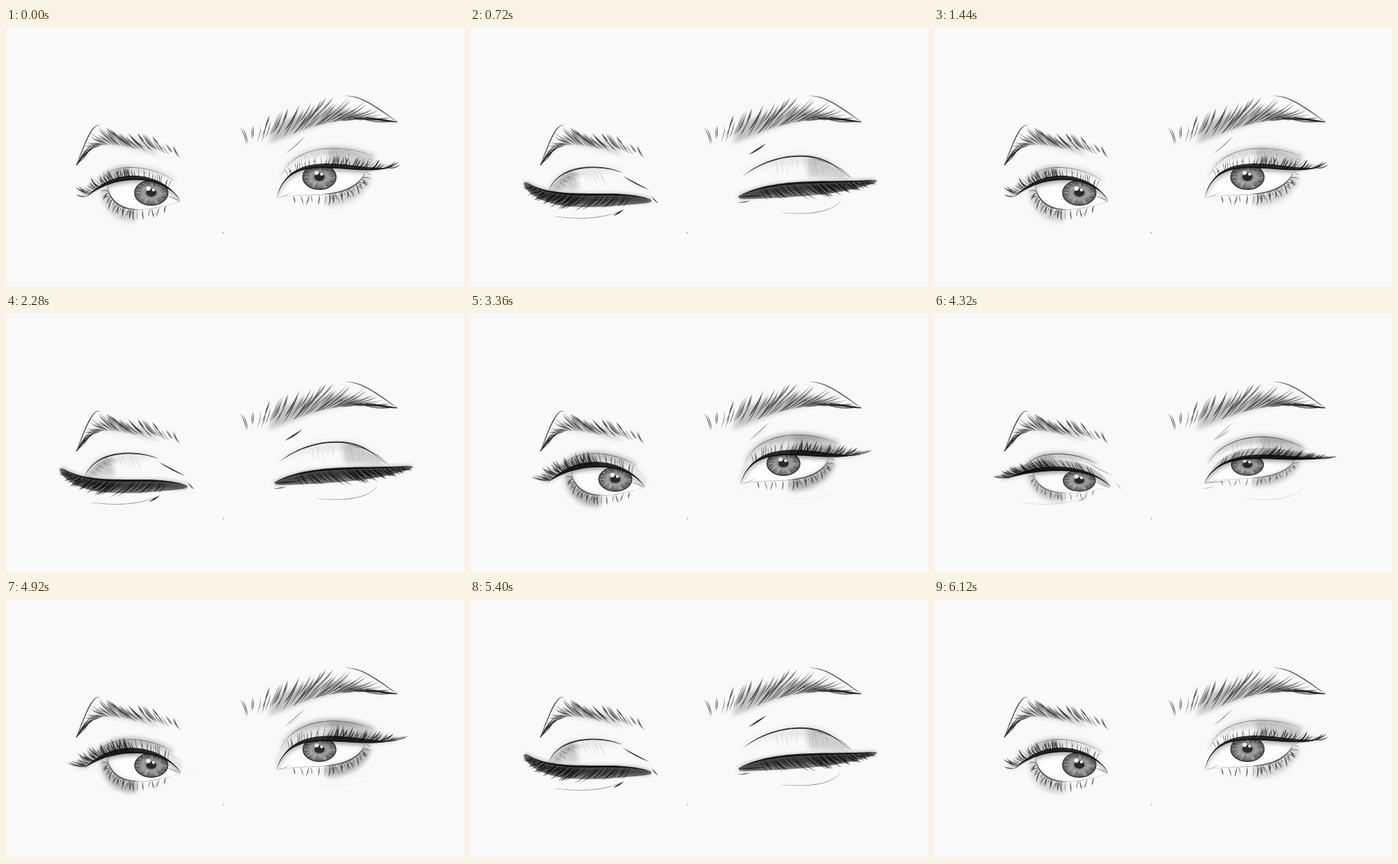
Animation, 640 px wide and 360 px high, one loop 6.24 s. Source, as an HTML page:

```html
<!DOCTYPE html>
<html lang="en">
<head>
<meta charset="utf-8">
<title>Blinking eyes</title>
<style>
  html, body { margin: 0; width: 100%; height: 100%; overflow: hidden; background: #f9f9f9; }
  svg { display: block; width: 100vw; height: 100vh; }
</style>
</head>
<body>
<svg id="stage" viewBox="0 0 640 360" fill="#0b0b0b">
  <defs>
    <filter id="soft" x="-30%" y="-60%" width="160%" height="220%"><feGaussianBlur stdDeviation="3"/></filter>
    <filter id="pencil"><feGaussianBlur stdDeviation=".35"/></filter>
    <radialGradient id="irisTone">
      <stop offset="0" stop-color="#666"/>
      <stop offset=".5" stop-color="#a0a0a0"/>
      <stop offset="1" stop-color="#5c5c5c"/>
    </radialGradient>
  </defs>
</svg>
<script>
const stage = document.getElementById('stage');
const OPEN = 0, CLOSED = 5;

// Cubic Béziers from the inner to the outer end; pairs are [open, closed].
const eyes = [
  {
    name: 'left', side: -1,
    lid: ['244,242 222,202 150,202 112,236', '254,240 205,222 125,246 78,215'],
    crease: ['236,214 215,196 155,183 132,210', '213,202 185,190 125,188 110,227'],
    low: '244,242 215,250 150,272 141,219',
    underline: '211,254 185,268 145,267 113,262',
    iris: [203, 230],
    openMarks: ['244,242 224,234', '204,262 214,257'],
    closedMarks: ['200,262 215,253', '213,206 251,226', '254,235 263,245']
  },
  {
    name: 'right', side: 1,
    lid: ['378,238 395,166 480,208 536,195', '375,235 425,209 500,218 566,212'],
    crease: ['383,210 398,166 460,158 515,179', '381,207 420,175 490,165 522,204'],
    low: '378,238 412,226 480,246 502,202',
    underline: '428,257 470,262 508,258 519,239',
    iris: [438, 208],
    openMarks: ['390,176 418,151', '379,238 400,229'],
    closedMarks: ['389,177 414,161', '374,235 413,233', '374,244 392,241']
  }
];

const brows = [
  { side: -1, weight: .7, lower: '246,184 205,175 160,165 120,164 98,192', upper: '236,162 195,147 155,144 124,138 98,192' },
  { side: 1, weight: 1, lower: '336,168 376,158 430,138 490,125 547,131', upper: '322,136 380,116 430,99 490,97 547,131' }
];

const mix = (a, b, t) => a + (b - a) * t;
const mixPoint = (p, q, t) => [mix(p[0], q[0], t), mix(p[1], q[1], t)];
const shift = (p, dx, dy) => [p[0] + dx, p[1] + dy];
const noise = n => { const s = Math.sin(n * 12.9898) * 43758.5453; return s - Math.floor(s); };
const parse = text => text.split(' ').map(pair => pair.split(',').map(Number));
const xy = p => p[0].toFixed(1) + ',' + p[1].toFixed(1);
const hump = u => Math.sin(Math.PI * Math.min(Math.max(u, 0), 1));

function bezier(text) {
  const pts = parse(text);
  return u => {
    let level = pts;
    while (level.length > 1) level = level.slice(1).map((p, i) => mixPoint(level[i], p, u));
    return level[0];
  };
}

// Smooth curve through the points
function spline(text) {
  const pts = parse(text), last = pts.length - 1;
  return u => {
    const x = Math.min(Math.max(u, 0), 1) * last, i = Math.min(Math.floor(x), last - 1), t = x - i;
    const [a, b, c, d] = [-1, 0, 1, 2].map(k => pts[Math.min(Math.max(i + k, 0), last)]);
    return [0, 1].map(k => b[k] + .5 * t * (c[k] - a[k] +
      t * (2 * a[k] - 5 * b[k] + 4 * c[k] - d[k] + t * (3 * (b[k] - c[k]) + d[k] - a[k]))));
  };
}

const blend = (a, b, t) => u => mixPoint(a(u), b(u), typeof t === 'function' ? t(u) : t);
const lift = (c, dy) => u => shift(c(u), 0, dy);
const part = (c, from, to = 1) => u => c(mix(from, to, u));

const samples = (c, n = 28) => Array.from({ length: n + 1 }, (_, i) => c(i / n));
const polygon = pts => 'M' + pts.map(xy).join('L') + 'Z';
const area = (a, b) => polygon([...samples(a), ...samples(b).reverse()]);

// Leaf-shaped pencil stroke
function stroke(p, q, width, bend = 0) {
  const dx = q[0] - p[0], dy = q[1] - p[1], len = Math.hypot(dx, dy) || 1;
  const control = k => xy([(p[0] + q[0]) / 2 - dy * (bend + k / len), (p[1] + q[1]) / 2 + dx * (bend + k / len)]);
  return `M${xy(p)}Q${control(width)} ${xy(q)}Q${control(-width)} ${xy(p)}Z`;
}

// Long stroke that tapers at both ends
function ribbon(c, width) {
  const side = sign => u => {
    const p = c(u), a = c(Math.max(u - .02, 0)), b = c(Math.min(u + .02, 1));
    const k = sign * width / 2 * Math.pow(hump(u), .7) / (Math.hypot(b[0] - a[0], b[1] - a[1]) || 1);
    return shift(p, (a[1] - b[1]) * k, (b[0] - a[0]) * k);
  };
  return area(side(1), side(-1));
}

// Row of strokes from one curve to another
function hairs(root, tip, { n, width, bend = 0, from = 0, to = 1, trimRoot = 0, trimTip = .3, seed = 1, spread = .03 }) {
  let d = '';
  for (let i = 0; i < n; i++) {
    const r = k => noise(i * 7 + k + seed * 101);
    const u = mix(from, to, (i + r(1)) / n), a = root(u), b = tip(u + (r(2) - .5) * spread);
    d += stroke(mixPoint(a, b, r(3) * trimRoot), mixPoint(a, b, 1 - r(4) * trimTip),
      width * (.6 + .7 * r(5)), bend * (.6 + .8 * r(6)));
  }
  return d;
}

const paint = (d, alpha, extra = '') => alpha > .01 ? `<path d="${d}" fill-opacity="${alpha.toFixed(3)}" ${extra}/>` : '';
const SOFT = 'filter="url(#soft)"';

function drawBrow({ side, weight, lower, upper }) {
  const low = spline(lower), up = spline(upper), bend = .1 * side;
  // Hairs stand at the inner end and lie down towards the tail.
  const tip = u => up(u + .24 * Math.min(1, u * 1.8));
  const core = u => mixPoint(low(u), tip(u), .6);
  return paint(area(part(low, .2), part(core, .2)), .22 * weight, SOFT) +
    paint(hairs(low, tip, { n: 46, width: 1, bend, trimRoot: .4, trimTip: .3, seed: 3 }), .6) +
    paint(hairs(low, tip, { n: 24, width: 1.3, bend, trimRoot: .6, trimTip: .1, seed: 5, from: .1 }), .6) +
    paint(hairs(low, core, { n: 32, width: 1.3, bend, trimTip: .3, seed: 8, from: .35 }), .55 * weight) +
    paint(ribbon(part(low, .72), 1.5), .6) + paint(ribbon(part(up, .68), 1.5), .7);
}

function drawIris([x, y], shut) {
  const cx = x, cy = y + 8 * shut, rx = mix(24, 21, shut), ry = mix(18, 9, shut);
  const at = (angle, k) => [cx + Math.cos(angle) * rx * k, cy + Math.sin(angle) * ry * k];
  const oval = (k, attrs) => `<ellipse cx="${cx}" cy="${cy}" rx="${rx * k}" ry="${ry * k}" ${attrs}/>`;
  const spokes = (n, inner, width) => Array.from({ length: n }, (_, i) => {
    const angle = (i + noise(i)) / n * Math.PI * 2;
    return stroke(at(angle, .97), at(angle + .1, mix(inner, .85, noise(i + 4))), width);
  }).join('');
  const glint = (dx, dy, r) => `<circle cx="${cx + dx}" cy="${cy + dy}" r="${r}" fill="#fff"/>`;
  return oval(1, 'fill="url(#irisTone)"') + paint(spokes(30, .35, .9), .5) +
    paint(spokes(11, .3, 1.8), .35, 'fill="#fff"') +
    oval(.96, 'fill="none" stroke="#222" stroke-opacity=".6" stroke-width="1.4"') +
    oval(.3, 'fill="#1c1c1c" fill-opacity=".85"') + glint(-4, -6, 2.9) + glint(3, -4, 2);
}

function drawEye(eye, pose) {
  const { side, name } = eye;
  const shut = pose ? mix(.08, 1, (pose - 1) / 4) : 0, open = 1 - shut;
  const fuller = pose ? 1 : 0;
  const lid = blend(bezier(eye.lid[0]), bezier(eye.lid[1]), shut);
  const crease = blend(bezier(eye.crease[0]), bezier(eye.crease[1]), shut);
  const low = blend(bezier(eye.low), lid, shut * shut);
  const bend = .14 * side;

  // Point at a length and angle from another; 0 degrees is up, positive leans outwards.
  const polar = (p, degrees, length) => {
    const a = degrees * Math.PI / 180;
    return shift(p, side * Math.sin(a) * length, -Math.cos(a) * length);
  };
  const lashTip = u => polar(lid(u),
    mix(mix(-25, 72, u * u), mix(150, 115, u), shut),
    mix(mix(12, 24, u) + 4 * fuller, 5 + 30 * Math.pow(hump(u), .8), shut));
  const lowTip = u => polar(low(u), mix(178, 125, u * u), mix(6, 18, hump(u * .85)) * open);
  const liner = u => shift(lid(u), 0, -(5.5 + 2 * fuller) * open * hump(Math.pow(u, 1.4)));
  const lidSkin = blend(crease, part(lid, .1, .85), .8);
  const opening = area(lid, low);
  let out = '';

  // Eyelid
  out += paint(area(lift(crease, -3), blend(crease, lid, u => .3 * hump(u))), mix(.13 + .14 * fuller, .06, shut), SOFT);
  out += paint(area(part(crease, .6), part(lidSkin, .6)), .17, SOFT);
  out += paint(hairs(crease, lidSkin, { n: 26, width: .5, from: .3, trimRoot: .3, trimTip: .6, seed: 12 }), .25);
  out += paint(hairs(crease, u => shift(crease(u), 18, 9), { n: 26, width: .5, from: .62, seed: 51 }), .45 * shut);
  out += paint(ribbon(crease, mix(.9, 2, shut)), mix(.45, .8, shut));

  // Eyeball and lower lid
  if (pose < CLOSED) {
    out += `<clipPath id="${name}${pose}"><path d="${opening}"/></clipPath>` + paint(opening, 1, 'fill="#fdfdfd"') +
      `<g clip-path="url(#${name}${pose})">` + drawIris(eye.iris, shut) +
      paint(area(lift(lid, -3), lift(lid, 4)), .35, SOFT) + '</g>';
    out += paint(area(part(low, .5), part(lowTip, .5)), (.14 + .16 * fuller) * open, SOFT);
    out += paint(ribbon(low, .7), .35 * open) + paint(ribbon(part(low, .5), 2), .6 * open);
    out += paint(hairs(low, lowTip, { n: 12, width: 1.2, bend: -bend, from: .15, trimTip: .4, seed: 21, spread: .12 }), .7 * open);
    out += paint(hairs(low, lowTip, { n: 20, width: 1, bend: -bend, from: .5, trimTip: .6, seed: 23, spread: .08 }), .55 * open);
  }

  // Upper lashes
  out += paint(area(lid, liner), .85);
  out += paint(area(lid, blend(lid, lashTip, .72)), .55 * shut);
  out += paint(area(lid, blend(lid, lashTip, .5)), .5 * shut, SOFT);
  out += paint(area(part(lid, .5), blend(part(lid, .5), part(lashTip, .5), .45)), .3 * open * (.4 + .6 * fuller), SOFT);
  out += paint(ribbon(lid, mix(2, 3, shut)), .9);
  const lashes = { bend, from: .18, to: mix(1, .96, shut), spread: .07, trimTip: .45 };
  out += paint(hairs(lid, lashTip, { ...lashes, n: 34, width: mix(.9, 1.6, shut), seed: 31 }), .65);
  out += paint(hairs(lid, lashTip, { ...lashes, n: 20 + 10 * fuller, width: 1.4, from: .55, seed: 37 }), .7);
  out += paint(hairs(lid, lashTip, { ...lashes, n: 22, width: .6, trimRoot: .5, seed: 41 }), .35 * shut, 'fill="#eee"');

  out += paint(ribbon(bezier(eye.underline), .9), .45 * shut);
  const marks = (lines, width) => lines.map((line, i) => stroke(...parse(line), width / (1 + i * .4), .04)).join('');
  return out + paint(marks(eye.openMarks, 1), .55 * open) + paint(marks(eye.closedMarks, 2.3), .85 * shut);
}

let art = brows.map(drawBrow).join('') + '<circle cx="303.5" cy="285.5" r=".7" fill-opacity=".6"/>';
for (let pose = OPEN; pose <= CLOSED; pose++) {
  art += `<g class="pose" display="none">${eyes.map(eye => drawEye(eye, pose)).join('')}</g>`;
}
stage.insertAdjacentHTML('beforeend', `<g filter="url(#pencil)">${art}</g>`);
const poses = [...stage.querySelectorAll('.pose')];

// Close in five steps from 240 ms, hold, reopen in five steps from 960 ms.
const BLINK = 1560, STEP = 120;
const stepsSince = (t, start) => Math.min(CLOSED, Math.max(0, Math.floor((t - start) / STEP) + 1));
function poseAt(ms) {
  const t = ms % BLINK;
  return stepsSince(t, 240) - stepsSince(t, 960);
}

function update() {
  const pose = poseAt(performance.now());
  poses.forEach((g, i) => g.setAttribute('display', i === pose ? 'inline' : 'none'));
  requestAnimationFrame(update);
}
update();
</script>
</body>
</html>
```
